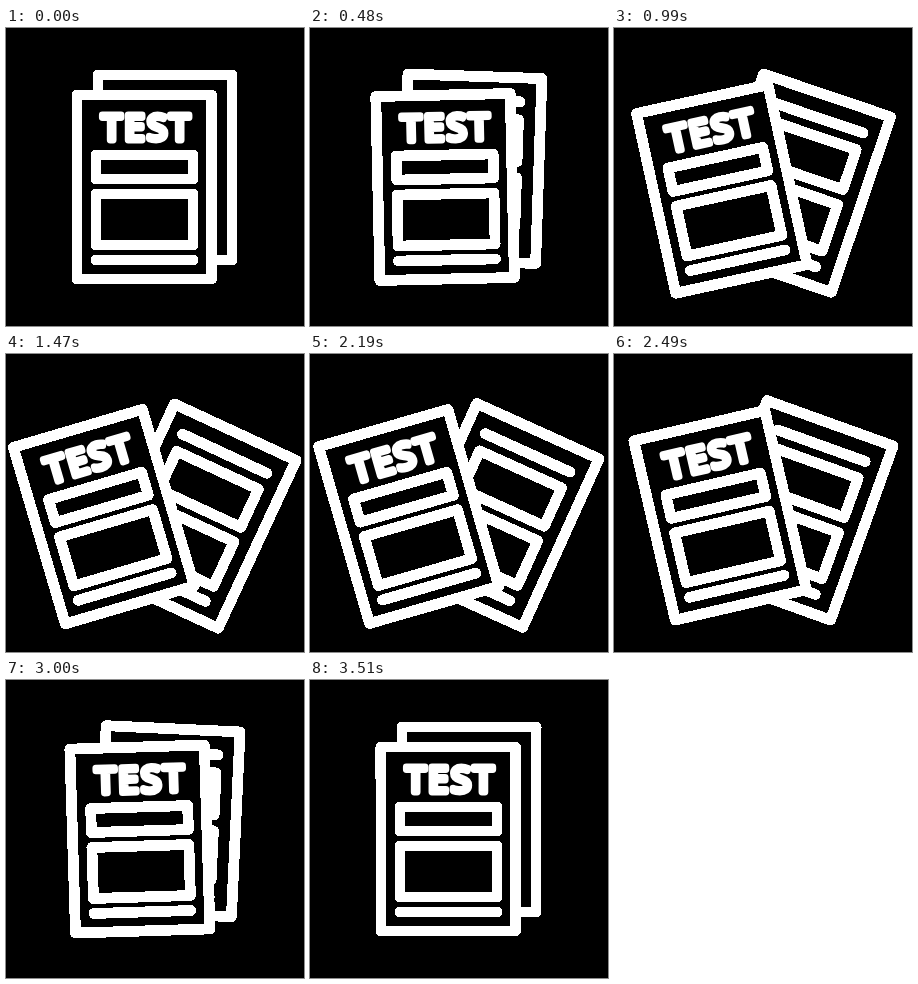
Recreate the animation shown at these times as an HTML page. Size 298x298 px, loop 3.6 s.

```html
<!DOCTYPE html>
<html lang="en">
<head>
<meta charset="utf-8">
<title>Test papers</title>
<style>
  html, body { margin: 0; width: 100%; height: 100%; overflow: hidden; background: #000; }
  svg { display: block; width: 100vw; height: 100vh; shape-rendering: crispEdges; }
  g { fill: #000; stroke: #fff; stroke-width: 10.8; stroke-linecap: round; stroke-linejoin: round; }
  text { font: 35px "Open Sans", sans-serif; letter-spacing: 3.3px; fill: #fff; stroke-width: 6.8; }
</style>
</head>
<body>
<svg viewBox="0 0 298 298">
  <g id="back">
    <rect x="92" y="47" width="134" height="185"/>
    <path d="M112 71H205M114 89H204V131H114ZM114 147H204V196H114ZM112 213H203"/>
  </g>
  <g id="front">
    <rect x="71" y="67" width="134.5" height="184"/>
    <path d="M90 127H187V151H90ZM90 166H187V217H90ZM90 232H187"/>
    <text x="96" y="112">TEST</text>
  </g>
</svg>
<script>
const LOOP = 3600, HALF = LOOP / 2, STEP = 30;
const front = document.getElementById("front");
const back = document.getElementById("back");

// cubic-bezier(.7, 0, .23, 1), solved for its parameter by bisection
function ease(x) {
  let low = 0, high = 1;
  for (let i = 0; i < 24; i++) {
    const s = (low + high) / 2, r = 1 - s;
    if (2.1 * s * r * r + 0.69 * s * s * r + s ** 3 < x) low = s;
    else high = s;
  }
  return low * low * (3 - 2 * low);
}

function draw(now) {
  const t = Math.min(Math.floor(now % LOOP / STEP) * STEP, LOOP - 3 * STEP);
  const spread = t < HALF ? ease(t / HALF) : 1 - ease(t / HALF - 1);
  front.setAttribute("transform",
    `translate(${-14.5 * spread} ${2 * spread}) rotate(${-16.8 * spread} 131 251)`);
  back.setAttribute("transform",
    `translate(${-spread} 0) rotate(${25.5 * spread} 124 224)`);
  requestAnimationFrame(draw);
}
requestAnimationFrame(draw);
</script>
</body>
</html>
```
